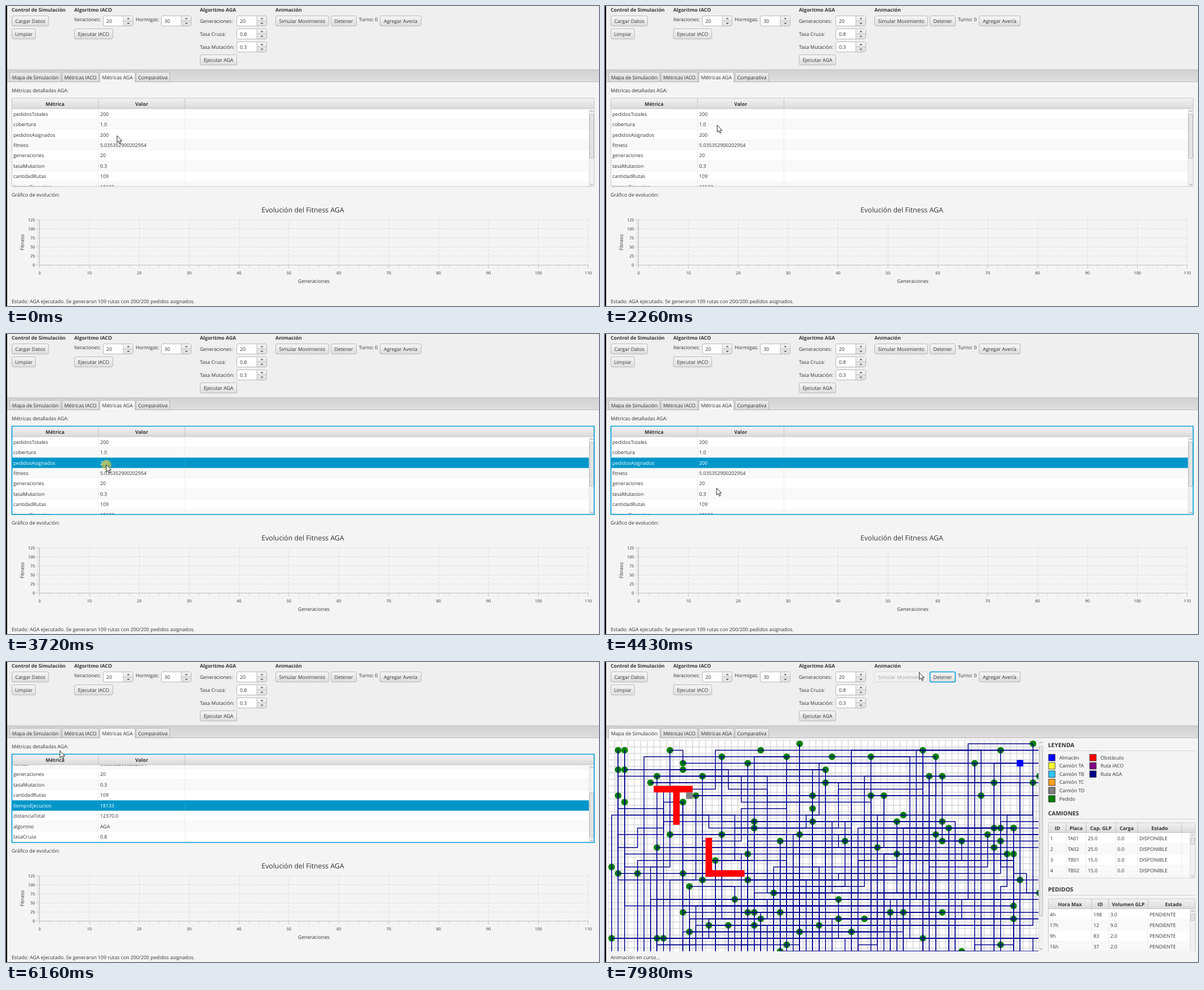
Write an HTML page with a canvas that moves like this. It is 1052 px wide and 532 px high and loops after 8 s.

```html
<!DOCTYPE html>
<html lang="es">
<head>
<meta charset="utf-8">
<title>Simulación de rutas</title>
<style>
  html, body { margin: 0; width: 100%; height: 100%; overflow: hidden; background: #f4f4f4; }
  canvas { display: block; width: 1052px; height: 532px; }
</style>
</head>
<body>
<canvas id="stage" width="1052" height="532"></canvas>
<script>
const W = 1052, H = 532, LOOP = 8000;
const stage = document.getElementById('stage').getContext('2d');
let g = stage;

const FONT = '"Open Sans", "Noto Sans", sans-serif';
const INK = '#333', EDGE = '#bdbdbd', BLUE = '#0096c9', FOCUS = '#039ed3', BACK = '#f4f4f4';
const ROUTE = '#00008b', GREEN = '#008000';

// ---- basic drawing ----
function rect(x, y, w, h, fill) {
  g.fillStyle = fill;
  g.fillRect(x, y, w, h);
}

function line(x1, y1, x2, y2, color, width = 1) {
  g.strokeStyle = color;
  g.lineWidth = width;
  g.beginPath();
  g.moveTo(x1, y1);
  g.lineTo(x2, y2);
  g.stroke();
}

function box(x, y, w, h, fill, stroke, radius = 2, width = 1) {
  g.beginPath();
  g.roundRect(x + 0.5, y + 0.5, w - 1, h - 1, radius);
  if (fill) { g.fillStyle = fill; g.fill(); }
  if (stroke) { g.strokeStyle = stroke; g.lineWidth = width; g.stroke(); }
}

function fade(y, h, top, bottom) {
  const f = g.createLinearGradient(0, y, 0, y + h);
  f.addColorStop(0, top);
  f.addColorStop(1, bottom);
  return f;
}

// y is the middle of the line of text
function text(s, x, y, { size = 8.75, bold = false, align = 'left', color = INK } = {}) {
  g.font = `${bold ? 'bold ' : ''}${size}px ${FONT}`;
  g.textAlign = align;
  g.fillStyle = color;
  g.fillText(s, x, y + size * 0.36);
}

function disc(x, y, r, color) {
  g.fillStyle = color;
  g.beginPath();
  g.arc(x, y, r, 0, Math.PI * 2);
  g.fill();
}

function triangle(x, y, dir, r = 2.6) {
  g.fillStyle = '#555';
  g.beginPath();
  g.moveTo(x - r, y + dir * r / 2);
  g.lineTo(x + r, y + dir * r / 2);
  g.lineTo(x, y - dir * r / 2);
  g.fill();
}

function chevron(x, y, dir) {
  g.strokeStyle = '#8a8a8a';
  g.lineWidth = 1;
  g.beginPath();
  g.moveTo(x - 2.5, y + dir);
  g.lineTo(x, y - dir);
  g.lineTo(x + 2.5, y + dir);
  g.stroke();
}

// ---- controls ----
function button(label, x, y, w, { focus = false, off = false, hover = false } = {}) {
  g.globalAlpha = off ? 0.4 : 1;
  box(x, y, w, 19, fade(y, 19, hover ? '#fff' : '#f7f7f7', hover ? '#eaeaea' : '#dcdcdc'),
    focus ? FOCUS : '#b8b8b8', 2.5, focus ? 1.6 : 1);
  text(label, x + w / 2, y + 9.6, { align: 'center' });
  g.globalAlpha = 1;
}

function spinner(value, x, y) {
  box(x, y, 54, 19, '#fff', '#b8b8b8', 2.5);
  rect(x + 36, y + 1, 17, 17, fade(y, 19, '#f5f5f5', '#dedede'));
  line(x + 36, y + 0.5, x + 36, y + 18.5, EDGE);
  line(x + 36, y + 9.5, x + 53.5, y + 9.5, EDGE);
  triangle(x + 45, y + 5, 1);
  triangle(x + 45, y + 14, -1);
  text(value, x + 6, y + 9.8);
}

function scrollbar(x, y, h, w, thumbY, thumbH) {
  rect(x, y, w, h, '#f0f0f0');
  line(x + 0.5, y, x + 0.5, y + h, '#dcdcdc');
  chevron(x + w / 2, y + 4, 1);
  chevron(x + w / 2, y + h - 4, -1);
  box(x + 1, thumbY, w - 2, thumbH, '#e4e4e4', '#bcbcbc', 2);
}

function table(o) {
  const { x, y, w, h, head, rowH, edges, titles, rows, offset = 0, selected = -1 } = o;
  const top = y + head, right = x + w - 10;
  rect(x, y, w, h, '#fff');
  g.save();
  g.beginPath();
  g.rect(x, top, w - 10, y + h - top);
  g.clip();
  rows.forEach((row, i) => {
    const ry = top + i * rowH - offset, on = i === selected;
    rect(x, ry, w, rowH, on ? BLUE : i % 2 ? '#f9f9f9' : '#fff');
    line(x, ry + rowH, right, ry + rowH, on ? BLUE : '#eeeeee');
    row.forEach((cell, c) => text(cell, edges[c] + 3, ry + rowH / 2, { color: on ? '#fff' : INK }));
    edges.slice(1).forEach(e => line(e, ry, e, ry + rowH, on ? '#1f9fcc' : '#ececec'));
  });
  g.restore();
  rect(x, y, w, head, fade(y, head, '#f3f3f3', '#dadada'));
  line(x, top - 0.5, x + w, top - 0.5, '#c4c4c4');
  edges.slice(1).forEach(e => line(e, y, e, top, '#c4c4c4'));
  titles.forEach((s, c) => text(s, (edges[c] + edges[c + 1]) / 2, y + head / 2 + 0.8, { bold: true, align: 'center' }));
  scrollbar(right, top, y + h - top, 10, o.thumbY, o.thumbH);
  box(x, y, w, h, null, o.focus ? FOCUS : '#c8c8c8', 0, o.focus ? 1.7 : 1);
}

// ---- top panel ----
function controls(s) {
  rect(0, 0, W, 113, '#efefef');
  [['Control de Simulación', 10], ['Algoritmo IACO', 121], ['Algoritmo AGA', 344], ['Animación', 478]]
    .forEach(([label, x]) => text(label, x, 7, { bold: true }));
  button('Cargar Datos', 10, 17, 66);
  button('Limpiar', 10, 40, 43);
  button('Ejecutar IACO', 121, 40, 69);
  button('Ejecutar AGA', 344, 86, 66);
  button('Simular Movimiento', 478, 17, 95, { off: s.running, focus: s.pressed, hover: s.overPlay });
  button('Detener', 576, 17, 46, { focus: s.running });
  button('Agregar Avería', 663, 17, 74);
  text('Iteraciones:', 121, 23.5);
  text('Hormigas:', 230, 23.5);
  text('Turno: 0', 626, 23.5);
  spinner('20', 172, 17);
  spinner('30', 275, 17);
  [['Generaciones:', '20'], ['Tasa Cruza:', '0.8'], ['Tasa Mutación:', '0.3']].forEach(([label, v], i) => {
    text(label, 344, 26.7 + i * 23);
    spinner(v, 409, 17 + i * 23);
  });
}

const TABS = [['Mapa de Simulación', 6, 92], ['Métricas IACO', 99, 66], ['Métricas AGA', 166, 63.5], ['Comparativa', 230, 61]];

function tabs(s) {
  rect(0, 113, W, 22, fade(113, 22, '#d2d2d2', '#dedede'));
  line(0, 113, W, 113, '#bcbcbc');
  line(0, 134.5, W, 134.5, EDGE);
  const active = s.map ? 0 : 2;
  TABS.forEach(([label, x, w], i) => {
    const on = i === active, light = i === 0 && s.overTab;
    g.beginPath();
    g.roundRect(x + 0.5, 117.5, w - 1, on ? 18 : 17, [3, 3, 0, 0]);
    g.fillStyle = on ? BACK : fade(117, 18, light ? '#f8f8f8' : '#ececec', light ? '#ebebeb' : '#d8d8d8');
    g.fill();
    g.strokeStyle = '#b5b5b5';
    g.lineWidth = 1;
    g.stroke();
    if (on) rect(x + 1, 134, w - 2, 2, BACK);
    if (on && s.tabFocus) box(x, 117, w, 18, null, FOCUS, 2, 1.2);
    text(label, x + w / 2, 126.6, { align: 'center' });
  });
}

// ---- metrics view ----
const METRICS = [
  ['pedidosTotales', '200'], ['cobertura', '1.0'], ['pedidosAsignados', '200'],
  ['fitness', '5.035352900202954'], ['generaciones', '20'], ['tasaMutacion', '0.3'],
  ['cantidadRutas', '109'], ['tiempoEjecucion', '18133'], ['distanciaTotal', '12370.0'],
  ['algorimo', 'AGA'], ['tasaCruza', '0.8'],
];

function metrics(s) {
  text('Métricas detalladas AGA:', 10, 149.7);
  table({
    x: 10, y: 163, w: 1034, h: 157.5, head: 19.4, rowH: 18.42, edges: [10, 164, 317.5],
    titles: ['Métrica', 'Valor'], rows: METRICS, offset: s.scroll, selected: s.selected,
    focus: s.selected >= 0, thumbY: 191 + s.scroll * 0.606, thumbH: 80,
  });
  text('Gráfico de evolución:', 10, 334.7);
  chart();
}

function chart() {
  const x0 = 59.5, y0 = 459.5, dx = 88.5, dy = 16.1, right = x0 + 11 * dx, top = y0 - 5 * dy;
  text('Evolución del Fitness AGA', 526.5, 361.7, { size: 12.3, align: 'center' });
  g.setLineDash([4, 2.5]);
  for (let i = 0; i <= 5; i++) line(x0, y0 - i * dy, right, y0 - i * dy, '#dadada');
  for (let i = 1; i <= 11; i++) line(x0 + i * dx, top, x0 + i * dx, y0, '#dadada');
  g.setLineDash([]);
  line(x0, top, x0, y0, EDGE);
  line(x0, y0, right, y0, EDGE);
  for (let i = 0; i <= 25; i++) {
    const y = y0 - i * dy / 5;
    line(x0 - (i % 5 ? 4 : 6), y, x0, y, '#c2c2c2', i % 5 ? 0.7 : 1);
    if (i % 5 === 0) text(String(i * 5), 51.5, y, { size: 7.3, align: 'right' });
  }
  for (let i = 0; i <= 55; i++) {
    const x = x0 + i * dx / 5;
    line(x, y0, x, y0 + (i % 5 ? 4 : 6), '#c2c2c2', i % 5 ? 0.7 : 1);
    if (i % 5 === 0) text(String(i * 2), x, 473.5, { size: 7.3, align: 'center' });
  }
  text('Generaciones', 546, 488.3, { align: 'center' });
  g.save();
  g.translate(29, 419);
  g.rotate(-Math.PI / 2);
  text('Fitness', 0, 0, { align: 'center' });
  g.restore();
}

// ---- map view ----
const CELL = 11.5, LEFT = 6, TOP = 139.2, COLS = 70, ROWS = 50;
const cx = c => LEFT + (c + 0.5) * CELL;
const cy = r => TOP + (r + 0.5) * CELL;
const DEPOT = [12, 8], STORE = [63, 3];

// obstacles as column, row, width and height: a T and an L
const WALLS = [[7, 7, 6, 1], [10, 7, 1, 6], [15, 15, 1, 6], [15, 20, 6, 1]];
const isWall = (c, r) => WALLS.some(([x, y, w, h]) => c >= x && c < x + w && r >= y && r < y + h);

let seed = 41;
const rnd = () => (seed = (seed * 16807) % 2147483647) / 2147483647;

function makeOrders(count) {
  const orders = [];
  while (orders.length < count) {
    const c = Math.floor(rnd() * COLS), r = Math.floor(rnd() * ROWS);
    if (!isWall(c, r)) orders.push([c, r]);
  }
  return orders;
}

// stairs of one to three steps between two cells
function leg([c0, r0], [c1, r1]) {
  const steps = 1 + Math.floor(rnd() * 3), acrossFirst = rnd() < 0.5;
  let c = c0, r = r0;
  g.beginPath();
  g.moveTo(cx(c), cy(r));
  for (let i = 1; i <= steps; i++) {
    const nc = Math.round(c0 + (c1 - c0) * i / steps), nr = Math.round(r0 + (r1 - r0) * i / steps);
    g.lineTo(cx(acrossFirst ? nc : c), cy(acrossFirst ? r : nr));
    g.lineTo(cx(nc), cy(nr));
    [c, r] = [nc, nr];
  }
  g.stroke();
}

function drawMap() {
  const cells = (c, r, w, h, color) => rect(LEFT + c * CELL, TOP + r * CELL, w * CELL, h * CELL, color);
  const orders = makeOrders(200), stops = [DEPOT, STORE, ...orders];
  g.save();
  g.beginPath();
  g.rect(LEFT, 139, 763, 374);
  g.clip();
  rect(LEFT, 139, 763, 374, '#fff');
  for (let c = 0; c <= COLS; c++) line(LEFT + c * CELL, TOP, LEFT + c * CELL, 513, '#d3d3d3', 1.3);
  for (let r = 0; r <= ROWS; r++) line(LEFT, TOP + r * CELL, 769, TOP + r * CELL, '#d3d3d3', 1.3);
  orders.forEach(([c, r]) => disc(cx(c), cy(r), 5.8, GREEN));
  g.strokeStyle = ROUTE;
  g.lineWidth = 1.5;
  stops.slice(1).forEach((stop, i) => leg(stops[i], stop));
  WALLS.forEach(wall => cells(...wall, '#f00'));
  cells(...DEPOT, 1, 1, '#808080');
  cells(...STORE, 1, 1, '#00f');
  g.restore();
  scrollbar(769, 139, 374, 9, 149, 302);
}

const LEGEND = [
  ['Almacén', '#00f'], ['Camión TA', '#ffff33'], ['Camión TB', '#33c5ff'], ['Camión TC', '#ffa020'],
  ['Camión TD', '#808080'], ['Pedido', GREEN],
  ['Obstáculo', '#f00'], ['Ruta IACO', '#800080'], ['Ruta AGA', ROUTE],
];

function heading(s, y) {
  text(s, 786, y, { size: 10.3, bold: true });
  line(786, y + 10.5, 1047, y + 10.5, '#cfcfcf');
}

function drawSide() {
  heading('LEYENDA', 147);
  LEGEND.forEach(([label, color], i) => {
    const x = i < 6 ? 786 : 859, y = 169.5 + (i % 6) * 14.6;
    box(x + 0.4, y - 6.2, 12.5, 12.5, color, '#222', 0, 0.8);
    text(label, x + 20, y);
  });
  heading('CAMIONES', 268);
  table({
    x: 786, y: 284.5, w: 261.5, h: 99, head: 18.5, rowH: 19.2, edges: [787, 818, 853.5, 906, 945, 1023],
    titles: ['ID', 'Placa', 'Cap. GLP', 'Carga', 'Estado'],
    rows: ['TA01', 'TA02', 'TB01', 'TB02'].map((p, i) => [`${i + 1}`, p, i < 2 ? '25.0' : '15.0', '0.0', 'DISPONIBLE']),
    thumbY: 311, thumbH: 13,
  });
  heading('PEDIDOS', 403);
  g.save();
  g.beginPath();
  g.rect(780, 415, 272, 98);
  g.clip();
  table({
    x: 786, y: 419.5, w: 261.5, h: 130, head: 18.5, rowH: 19.2, edges: [786, 863.5, 893.5, 963, 1054],
    titles: ['Hora Max', 'ID', 'Volumen GLP', 'Estado'],
    rows: [['4h', '198', '3.0'], ['17h', '12', '9.0'], ['9h', '83', '2.0'], ['16h', '37', '2.0']].map(r => [...r, 'PENDIENTE']),
    thumbY: 446, thumbH: 13,
  });
  g.restore();
}

const mapView = document.createElement('canvas');
mapView.width = W;
mapView.height = H;
g = mapView.getContext('2d');
g.textRendering = 'geometricPrecision';
drawMap();
drawSide();
g = stage;
g.textRendering = 'geometricPrecision';

// ---- pointer: time, x, y ----
const MOVES = [
  [20, 197, 230], [500, 228, 105], [810, 295, 16], [1040, 343, -18], [1180, 574, -18],
  [1320, 358, 140], [1980, 231, 247], [2420, 181, 191], [2640, 181, 191], [2830, 187, 230],
  [3200, 181.5, 224.5], [3470, 178, 232], [4060, 178, 232], [4430, 198, 273], [4720, 187, 287],
  [4870, 187, 287], [5350, 183, 257], [5630, 183, 257], [6300, 73, 131.5], [7020, 73, 131.5],
  [7580, 557.5, 18.5], [LOOP, 557.5, 18.5],
];
const CLICKS = [2480, 3720, 5480, 6680, 7830], CLICK_TIME = 150;

function pointer(t) {
  const i = MOVES.findIndex(m => m[0] > t);
  if (i <= 0) return MOVES[0].slice(1);
  const [t0, x0, y0] = MOVES[i - 1], [t1, x1, y1] = MOVES[i];
  const k = (t - t0) / (t1 - t0);
  return [x0 + (x1 - x0) * k, y0 + (y1 - y0) * k];
}

function drawPointer(x, y) {
  g.save();
  g.translate(x, y);
  g.beginPath();
  [[0, 0], [0, 12.4], [2.8, 9.8], [4.9, 14.4], [6.9, 13.5], [4.9, 9.2], [8.7, 9.2]].forEach(p => g.lineTo(...p));
  g.closePath();
  g.fillStyle = '#fff';
  g.strokeStyle = '#111';
  g.lineWidth = 0.9;
  g.fill();
  g.stroke();
  g.restore();
}

// ---- timeline ----
// latest value whose time has come
const at = (t, steps) => steps.reduce((v, [from, next]) => t >= from ? next : v, steps[0][1]);

function draw(t) {
  const [x, y] = pointer(t);
  const s = {
    map: t >= 6680,
    tabFocus: t >= 6680 && t < 7830,
    pressed: t >= 7830 && t < 7900,
    running: t >= 7900,
    overPlay: x > 478 && x < 573 && y > 17 && y < 36,
    overTab: x > 6 && x < 98 && y > 117 && y < 135,
    selected: at(t, [[0, -1], [2480, 0], [3720, 2], [5480, 7]]),
    scroll: at(t, [[0, 0], [4510, 30.7], [4590, 61.4], [4660, 66]]),
  };
  rect(0, 0, W, H, BACK);
  controls(s);
  tabs(s);
  if (s.map) g.drawImage(mapView, 0, 0);
  else metrics(s);
  text(s.running ? 'Animación en curso...' : 'Estado: AGA ejecutado. Se generaron 109 rutas con 200/200 pedidos asignados.', 10, 523.7);
  rect(0, 0, 2, H, '#000');
  if (CLICKS.some(c => t >= c && t < c + CLICK_TIME)) disc(x, y, 9, 'rgba(255, 205, 40, 0.55)');
  drawPointer(x, y);
}

const start = performance.now();
function tick() {
  draw((performance.now() - start) % LOOP);
  requestAnimationFrame(tick);
}
tick();
</script>
</body>
</html>
```
